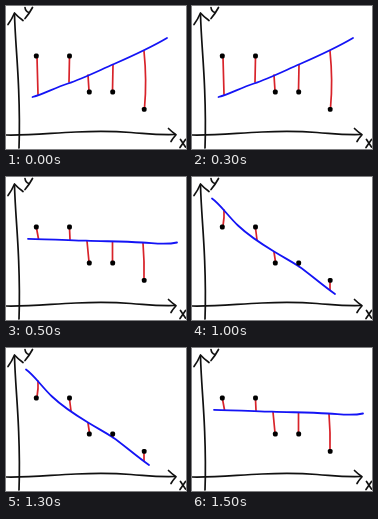
Animation of 180 by 143 pixels, one loop 2000 ms. Source, as an HTML page:

```html
<!DOCTYPE html>
<html>
<head>
<meta charset="utf-8">
<style>
  html, body { margin: 0; width: 100%; height: 100%; overflow: hidden; background: #fff; }
  svg { display: block; width: 100vw; height: 100vh; }
  path { fill: none; stroke-linecap: round; stroke-linejoin: round; }
  .ink { stroke: #111; stroke-width: 1.7; }
  .error { stroke: #d8232a; stroke-width: 1.7; }
  .fit { stroke: #1414f5; stroke-width: 1.8; }
</style>
</head>
<body>
<svg viewBox="0 0 180 143">
  <g class="ink">
    <path d="M8.500 8C9 30 11.500 55 12.500 80S14 115 13 142"/>
    <path d="M2 18.500Q6 13 8.500 7Q12 11 17 14.500"/>
    <path d="M0 129C25 129.500 45 127 70 126S105 125 125 126.500S150 129 169 128.500"/>
    <path d="M162.500 122.500Q166 126 170 128.700Q167 132 165 135.500"/>
    <path d="M19 1.500Q19.500 5.500 23 6.500M26.500 1.500Q23 8 19 12.500"/>
    <path d="M174.500 133.500L179.500 141M179.500 133.500L174 141.500"/>
  </g>
  <path id="errors" class="error"/>
  <path id="fit" class="fit"/>
  <g id="dots"></g>
</svg>
<script>
const flat = {
  fit: "M22 61.800C40 62 60 63 80 63.700S118 64.300 136 65.500S160 68 171 65.500",
  errors: "M30.500 51L32.500 62M63.500 51L64 62.500M81 64L83 85M106.500 65L106.500 85M137 66Q138.500 85 138 102"
};
const rising = {
  fit: "M26.500 91C38 88 48 82 62 77.500S92 65 108 58S144 42 161 32",
  errors: "M31 51L32 88.500M63.500 51L63 76M82 69L83 85M107 59L106.500 85M138 45Q141 75 138.500 102"
};
const falling = {
  fit: "M20 21.500C28 27 36 39 46 48.500S68 66 82 74.500S98 83.500 107 89.500S130 108 143 117",
  errors: "M32 33Q32.500 40 31 49M63.500 51L65 63M82 75L83.500 85M106.500 87L107 89.500M138 104L138 113"
};
const poses = [rising, flat, falling, flat];
const byId = id => document.getElementById(id);

byId("dots").innerHTML = [[30.300, 50], [63.500, 50], [83.300, 86], [106.700, 86], [138.200, 103.300]]
  .map(([x, y]) => `<rect x="${x - 2.400}" y="${y - 2.400}" width="4.800" height="4.800" rx="1.600"/>`)
  .join("");

function draw(now) {
  const pose = poses[Math.floor(now / 500) % poses.length];
  for (const id in pose) byId(id).setAttribute("d", pose[id]);
  requestAnimationFrame(draw);
}
draw(0);
</script>
</body>
</html>
```
